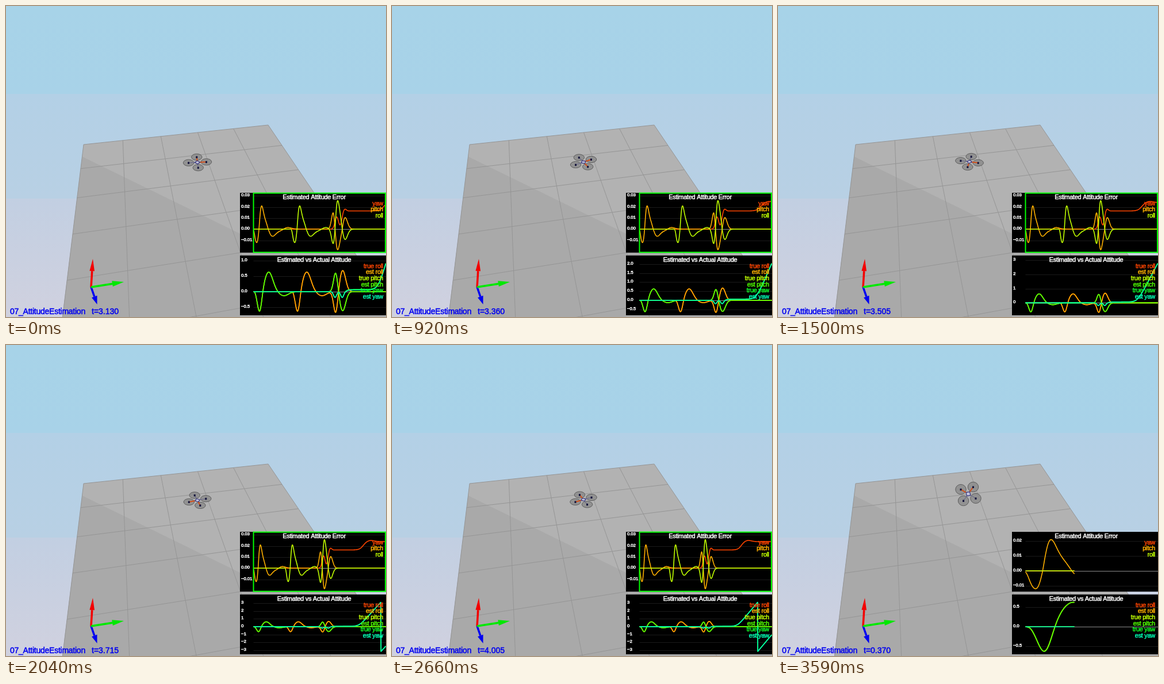
An HTML page with a canvas that plays this animation: 661 by 541 pixels, repeating every 3.69 s.

```html
<!DOCTYPE html>
<html lang="en">
<head>
<meta charset="utf-8">
<title>Attitude estimation</title>
<style>
html, body { margin: 0; width: 661px; height: 541px; overflow: hidden; }
canvas { display: block; }
</style>
</head>
<body>
<canvas id="stage" width="661" height="541"></canvas>
<script>
const ctx = document.getElementById('stage').getContext('2d');
const LOOP = 3690, TICKS = 63, TICK = 5.8;
const FONT = '"Liberation Sans", Arial, sans-serif';
const RED = '#ff4500', AMBER = '#ffb000', LIME = '#c0ff00';
const GREEN = '#50ff00', BRIGHT = '#10ff28', TEAL = '#00ffb4';

const bump = (t, centre, width) => Math.exp(-(((t - centre) / width) ** 2));
const sigmoid = (t, centre, width) => 1 / (1 + Math.exp((centre - t) / width));
const wrap = a => a > Math.PI ? a - 2 * Math.PI : a;

// Attitude in radians: one tilt pulse per axis, then a combined swing and a steady spin
const pulse = t => t <= 0 ? 0 : (1 - bump(t, 0, .04)) *
  (.63 * bump(t, .36, .14) - .68 * bump(t, .145, .075) - .13 * bump(t, .72, .15));
const swing = t => .68 * bump(t, 2.11, .1) - .7 * bump(t, 1.945, .07);
const pitch = t => pulse(t) - .9 * swing(t);
const roll = t => pulse(t - .9) + swing(t);
const yaw = t => .3 * Math.log1p(Math.exp((t - 2.965) / .06)) + .07 * sigmoid(t, 2.2, .03)
  - .18 * (bump(t, 1.93, .05) + bump(t, 2.1, .05));

// Tilt error follows the angular rate; yaw error builds up in two steps
const rateError = angle => t => {
  const rate = (angle(t + .02) - angle(t)) / .02;
  return rate * (rate > 0 ? .002 : .0016);
};
const pitchErr = rateError(pitch), rollErr = rateError(roll);
const yawErr = t => .0164 * sigmoid(t, 2.09, .02) + .0075 * sigmoid(t, 3.08, .055)
  + .011 * bump(t, 1.97, .06) + .002 * bump(t, 2.16, .05) + .0012 * bump(t, 3.28, .15);

const CHARTS = [
  { top: 325, title: 'Estimated Attitude Error', frame: true, series: [
    ['yaw', RED, yawErr], ['pitch', AMBER, pitchErr], ['roll', LIME, rollErr]] },
  { top: 434, title: 'Estimated vs Actual Attitude', series: [
    ['true roll', RED, roll], ['est roll', AMBER, t => roll(t) - rollErr(t)],
    ['true pitch', LIME, pitch], ['est pitch', GREEN, t => pitch(t) - pitchErr(t)],
    ['true yaw', BRIGHT, t => wrap(yaw(t))], ['est yaw', TEAL, t => wrap(yaw(t) - yawErr(t))]] }
];

// Loop time in ms to simulated seconds; the simulation restarts near the end
const CLOCK = [[0, 3.13], [520, 3.245], [920, 3.36], [1500, 3.505], [2030, 3.715], [2660, 4.005],
  [2720, .01], [3590, .37]];
function simTime(ms) {
  let i = 0;
  while (i < CLOCK.length - 2 && CLOCK[i + 1][0] <= ms) i++;
  const [a, s] = CLOCK[i], [b, e] = CLOCK[i + 1];
  return Math.round((s + (e - s) * (ms - a) / (b - a)) * 200) / 200;
}
const startOf = k => 10 * Math.floor(k * TICK + 1e-6);

function poly(points, fill) {
  ctx.beginPath();
  points.forEach(p => ctx.lineTo(p[0], p[1]));
  ctx.closePath();
  ctx.fillStyle = fill;
  ctx.fill();
}

function line([x0, y0], [x1, y1], color, width = 1) {
  ctx.beginPath();
  ctx.moveTo(x0, y0);
  ctx.lineTo(x1, y1);
  ctx.strokeStyle = color;
  ctx.lineWidth = width;
  ctx.stroke();
}

function text(str, x, y, size, color, align = 'left', spacing = -.3) {
  ctx.font = size + 'px ' + FONT;
  ctx.letterSpacing = spacing + 'px';
  ctx.textAlign = align;
  ctx.fillStyle = ctx.strokeStyle = color;
  ctx.lineWidth = .5;
  ctx.lineJoin = 'round';
  ctx.fillText(str, x, y);
  ctx.strokeText(str, x, y);
}

function drawSky() {
  [[0, 153, '#a7d3e8', '#a8d2e8'], [153, 335, '#b3d0e6', '#b8d0e4'],
   [335, 541, '#c2cfe2', '#d0d1df']].forEach(([y0, y1, a, b]) => {
    const g = ctx.createLinearGradient(0, y0, 0, y1);
    g.addColorStop(0, a);
    g.addColorStop(1, b);
    ctx.fillStyle = g;
    ctx.fillRect(0, y0, 661, y1 - y0);
  });
}

// Perspective position of floor tile corner (u, v)
function floorPoint(u, v) {
  const w = 1 + .016 * u - .0885 * v;
  return [(135 + 71.5 * u - 16.6 * v) / w, (241 - 3.49 * u + 16.8 * v) / w];
}

function drawFloor() {
  poly([[0, 0], [5, 0], [5, 7], [0, 7]].map(p => floorPoint(...p)), '#b2b2b2');
  poly([[132.5, 262], [407, 396], [661, 520], [661, 541], [98, 541]], '#a9a9a9');
  for (let i = 0; i <= 5; i++) {
    line(floorPoint(i, 0), floorPoint(i, 7), '#959595');
    line(floorPoint(0, i), floorPoint(5, i), '#959595');
  }
}

function arrow(tip, shaft, cone, color) {
  const origin = [148, 489];
  const dx = tip[0] - origin[0], dy = tip[1] - origin[1], len = Math.hypot(dx, dy);
  const base = [origin[0] + dx * shaft, origin[1] + dy * shaft];
  const nx = -dy / len * cone, ny = dx / len * cone;
  line(origin, base, color, 3.5);
  poly([tip, [base[0] + nx, base[1] + ny], [base[0] - nx, base[1] - ny]], color);
}

function drawAxes() {
  arrow([151, 440], .57, 4.3, '#f20000');
  arrow([158.5, 519], .55, 5, '#0000f0');
  arrow([205, 480], .65, 5, '#00e800');
}

function drawDrone(t) {
  const early = t < 1;
  const rise = t / .37;
  const cx = early ? 333 - 2 * rise * rise : 333;
  const cy = early ? 269 - 10 * rise * rise : 272 - 3 * Math.max(0, (t - 3.245) / .76);
  const flat = Math.max(.13, Math.sin(.64 + .85 * pitch(t)));
  const front = yaw(t) - 1.78;
  const corner = (i, r) => {
    const a = front + (2 * i - 1) * Math.PI / 4;
    return [cx + r * Math.cos(a), cy + r * flat * Math.sin(a)];
  };
  const rotors = [0, 1, 2, 3].map(i => corner(i, 15.5));
  rotors.forEach(([x, y]) => {
    ctx.beginPath();
    ctx.ellipse(x, y, 9.2, 9.4 * flat, 0, 0, 7);
    ctx.fillStyle = 'rgba(140,140,140,.85)';
    ctx.fill();
    ctx.strokeStyle = '#5c5c5c';
    ctx.lineWidth = 1;
    ctx.stroke();
  });
  rotors.forEach(([x, y], i) => {
    line([cx, cy], [x, y], i < 2 ? '#d4511c' : '#70708c', i < 2 ? 2 : 1.3);
    ctx.fillStyle = '#16163c';
    ctx.fillRect(x - 1.5, y - 1.5, 3, 3.5);
  });
  poly([0, 1, 2, 3].map(i => corner(i, 4.6)), '#c4c4dc');
  ctx.strokeStyle = '#34347c';
  ctx.lineWidth = 1.2;
  ctx.stroke();
}

function drawChart({ top, title, frame, series }, now) {
  const left = 430.5, span = 230, dt = .005;
  const count = Math.round(now / dt);
  const rows = series.map(s => Array.from({ length: count + 1 }, (_, i) => s[2](i * dt)));
  const all = rows.flat();
  const hi = Math.max(...all), lo = Math.min(...all);
  const range = Math.max(hi - lo, 1e-4);
  const X = i => left + span * i * dt / Math.max(1, now);
  const Y = v => top + 13.5 + 85.5 * (hi - v) / range;

  ctx.save();
  ctx.beginPath();
  ctx.rect(407, top, 254, 104);
  ctx.clip();
  ctx.fillStyle = '#000';
  ctx.fillRect(407, top, 254, 104);

  // Ticks at 1 or 5 of the nearest decade
  const decade = Math.floor(Math.log10(range));
  const half = range / 10 ** decade < 3;
  const step = 10 ** decade / (half ? 2 : 1);
  const digits = Math.max(0, half ? 1 - decade : -decade);
  for (let i = -8; i <= 8; i++) {
    const y = Math.round(Y(i * step)) + .5;
    if (y < top + 5 || y > top + 102) continue;
    line([left, y], [661, y], i ? '#1a1a1a' : '#8a8a8a');
    const label = (i < 0 ? '\u2212' : '') + Math.abs(i * step).toFixed(digits);
    text(label, 409, y, 8, '#fff', 'left', -.2);
  }

  rows.forEach((row, n) => {
    ctx.beginPath();
    row.forEach((v, i) => ctx.lineTo(X(i), Y(v)));
    ctx.strokeStyle = series[n][1];
    ctx.lineWidth = 1.6;
    ctx.lineJoin = 'round';
    ctx.stroke();
  });
  series.forEach(([name, color], n) => text(name, 656, top + 21.7 + n * 10.6, 11, color, 'right'));
  text(title, 536, top + 10.5, 11, '#fff', 'center');
  ctx.restore();
  if (frame && now > 1) {
    ctx.strokeStyle = '#00ff00';
    ctx.lineWidth = 2;
    ctx.lineJoin = 'miter';
    ctx.strokeRect(430.5, top + .5, 229.5, 103);
  }
}

function draw(t) {
  drawSky();
  drawFloor();
  drawDrone(t);
  drawAxes();
  CHARTS.forEach(c => drawChart(c, t));
  text('07_AttitudeEstimation', 7, 536, 14, '#0000f0', 'left', -.25);
  text('t=' + t.toFixed(3), 149, 536, 14, '#0000f0', 'left', 0);
}

let shown = -1;
const begin = performance.now();
function tick() {
  const ms = (performance.now() - begin) % LOOP;
  let k = TICKS - 1;
  while (k > 0 && startOf(k) > ms) k--;
  if (k !== shown) {
    shown = k;
    draw(simTime(startOf(k)));
  }
  requestAnimationFrame(tick);
}
tick();
</script>
</body>
</html>
```
